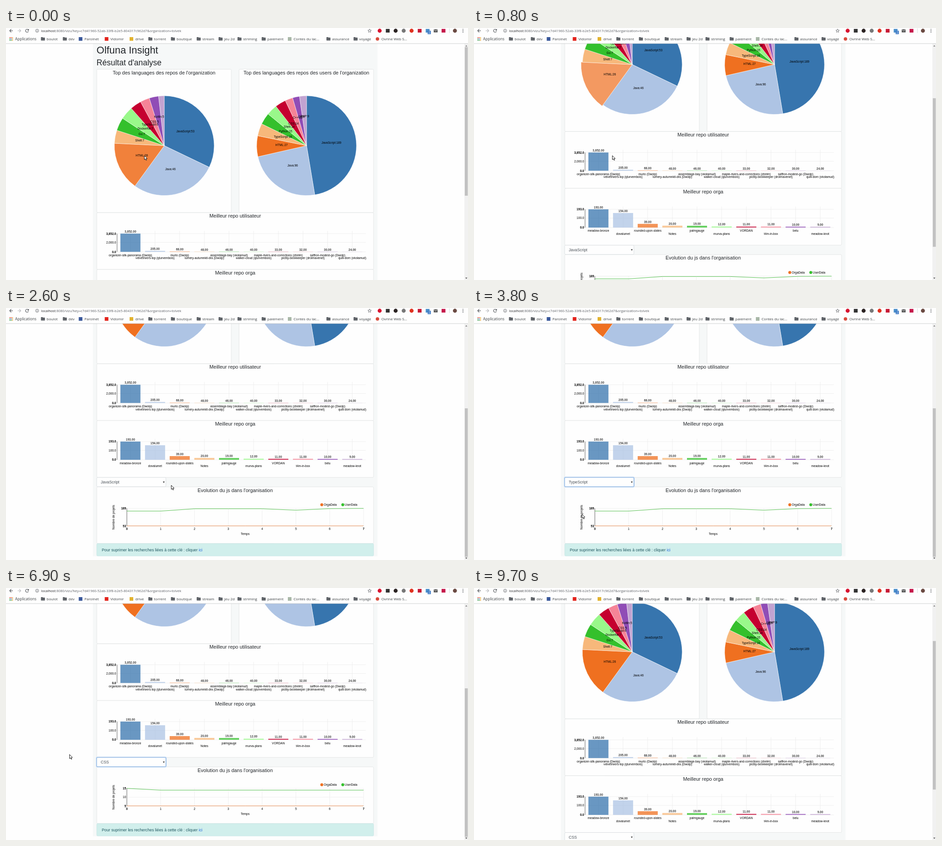
These frames come from a looping animation (1013 px wide and 553 px high, 9.9 s). An HTML page with a canvas:

```html
<!DOCTYPE html>
<html lang="fr">
<head>
<meta charset="utf-8">
<title>Tableau de bord</title>
<style>
  html, body { margin: 0; width: 100%; height: 100%; overflow: hidden; background: #fff; }
  canvas { display: block; }
</style>
</head>
<body>
<canvas id="stage" width="1013" height="553"></canvas>
<script>
const ctx = document.getElementById('stage').getContext('2d');
const LOOP = 9900, STEP = 100, TOP = 34;
const SANS = '"Liberation Sans", Arial, sans-serif';
const UI = '"Open Sans", "Noto Sans", sans-serif';
const SMALL = 6.56, TITLE = 10.94, BODY = 8.75;
const PALETTE = ['#3775ae', '#aec4e4', '#ef7020', '#f7b87b', '#34c02c',
                 '#99f88a', '#c5002f', '#f58497', '#904db6', '#c2a3d1'];

const orgLanguages = [['JavaScript', 53], ['Java', 46], ['HTML', 26], ['Shell', 7], ['Go', 7],
  ['Dockerfile', 7], ['TypeScript', 6], ['CSS', 5], ['Kotlin', 5], ['', 3]];
const userLanguages = [['JavaScript', 189], ['Java', 96], ['HTML', 27], ['TypeScript', 16], ['Python', 15],
  ['Shell', 14], ['CSS', 14], ['C++', 10], ['C#', 9], ['PHP', 9]];
const userRepos = [['organizer-silk-panorama (Dwolp)', 3852], ['velvetrivers-lop (qlurvembois)', 205],
  ['murlo (Dwolp)', 68], ['lumery-autumnkit-dra (Dwolp)', 48], ['assemblage-bay (vkolamud)', 46],
  ['walker-cloud (qlurvembois)', 40], ['maple-rivers-and-corrections (ztrelm)', 33],
  ['pictily-bookkeeper (drolmavenet)', 32], ['saffron-modest-go (Dwolp)', 30], ['quill-dorn (vkolamud)', 24]];
const orgRepos = [['meadow-bronze', 193], ['dovalumet', 154], ['rounded-upon-slates', 39], ['Notes', 20],
  ['palmgauge', 19], ['murva-plans', 12], ['VORDAN', 11], ['t4m-in-box', 11], ['belu', 10], ['meadow-knot', 9]];
const trends = {
  JavaScript: { min: 53, max: 189, ticks: [], user: [168, 168, 186, 186, 186, 175, 187, 189] },
  TypeScript: { min: 6, max: 16, ticks: [10], user: [14, 14, 16, 16, 16, 15, 16, 16] },
  CSS: { min: 5, max: 15, ticks: [10], user: [15, 14, 14, 14, 14, 14, 14, 14] }
};
const options = ['JavaScript', 'CSS', 'TypeScript', 'Python', 'HTML', 'Java', 'Shell'];

// Keyframes: time, then the values
const scrollKeys = [[500, 0], [600, 40], [700, 110], [800, 178], [900, 200], [1000, 213], [1100, 218.8],
  [1200, 218.8], [1300, 271.3], [1400, 282.8], [7300, 282.8], [7400, 220], [7500, 145], [7600, 118]];
const cursorKeys = [[2100, 303, 279.5], [2300, 378, 310], [2500, 372, 380], [2700, 352, 397], [2800, 352, 397],
  [2900, 344, 384], [3200, 344, 384], [3400, 243.5, 432], [3500, 243.5, 432], [3600, 236.5, 452],
  [4500, 236.5, 452], [4900, 300, 386], [5200, 300, 386], [5500, 262, 530], [5700, 242, 434],
  [6600, 242, 434], [6900, 139, 365], [7700, 139, 365], [8000, 21.5, 250], [8200, 4.5, 253],
  [8600, 4.5, 253], [9600, 9.5, 14]];

const clamp = x => Math.max(0, Math.min(1, x));
const mix = (a, b, k) => a + (b - a) * k;

function track(keys, t) {
  const next = keys.findIndex(key => key[0] > t);
  if (next === 0) return keys[0].slice(1);
  if (next < 0) return keys[keys.length - 1].slice(1);
  const a = keys[next - 1], b = keys[next];
  return a.slice(1).map((v, i) => mix(v, b[i + 1], (t - a[0]) / (b[0] - a[0])));
}

function text(s, x, y, { size = SMALL, align = 'left', color = '#000', weight = '', font = SANS } = {}) {
  ctx.font = `${weight} ${size}px ${font}`;
  ctx.textAlign = align;
  ctx.fillStyle = color;
  ctx.fillText(s, x, y);
}

function line(points, color, width = 0.6) {
  ctx.beginPath();
  points.forEach(([x, y]) => ctx.lineTo(x, y));
  ctx.strokeStyle = color;
  ctx.lineWidth = width;
  ctx.stroke();
}

function rect(x, y, w, h, color) {
  ctx.fillStyle = color;
  ctx.fillRect(x, y, w, h);
}

function dot(x, y, r, color) {
  ctx.beginPath();
  ctx.arc(x, y, r, 0, 7);
  ctx.fillStyle = color;
  ctx.fill();
}

function shape(points, color) {
  ctx.beginPath();
  points.forEach(([x, y]) => ctx.lineTo(x, y));
  ctx.closePath();
  ctx.fillStyle = color;
  ctx.fill();
}

function box(x, y, w, h, fill = '#fefefe', border = '#dcdedf', width = 0.7) {
  ctx.beginPath();
  ctx.roundRect(x, y, w, h, 2.2);
  ctx.fillStyle = fill;
  ctx.fill();
  ctx.strokeStyle = border;
  ctx.lineWidth = width;
  ctx.stroke();
}

function card(x, y, w, h, title) {
  box(x, y, w, h);
  text(title, x + w / 2, y + 11, { size: TITLE, align: 'center', color: '#212529' });
}

function pie(cx, data, raisedLabels, hover = 0) {
  const cy = 258.2, radius = 109.4, total = data.reduce((sum, d) => sum + d[1], 0);
  const labels = [];
  let start = -Math.PI / 2;
  data.forEach(([name, value], i) => {
    const end = start + value / total * Math.PI * 2, mid = (start + end) / 2;
    const lift = i === 2 ? hover : 0;
    ctx.beginPath();
    ctx.moveTo(cx, cy);
    ctx.arc(cx, cy, radius + 3 * clamp((lift - 0.4) / 0.6), start, end);
    ctx.closePath();
    ctx.globalAlpha = 1 - 0.3 * lift;
    ctx.fillStyle = PALETTE[i];
    ctx.fill();
    ctx.globalAlpha = 1;
    ctx.strokeStyle = '#fff';
    ctx.lineWidth = 0.6;
    ctx.stroke();
    const raise = raisedLabels.includes(i) ? 8.4 : 0;
    if (name) labels.push([`${name}:${value}`, cx + Math.cos(mid) * radius / 2, cy + Math.sin(mid) * radius / 2 - raise]);
    start = end;
  });
  labels.forEach(([s, x, y]) => text(s, x, y + 0.4, { align: 'center' }));
}

function barChart(base, data, tick) {
  const left = 243.5, height = 40, max = data[0][1];
  const center = i => 272.8 + 54.05 * i;
  const number = (v, digits) => v.toLocaleString('en-US', { minimumFractionDigits: digits });
  [0, tick, max].forEach(v => {
    const y = base - v / max * height;
    line([[left, y], [789, y]], '#e6e6e6');
    text(number(v, 1), 241.5, y + 2.3, { align: 'right', weight: v === tick ? '' : 'bold' });
  });
  data.forEach((d, i) => line([[center(i), base - 46], [center(i), base]], '#e6e6e6'));
  line([[left, base - height], [left, base]], '#444', 0.8);
  data.forEach(([name, value], i) => {
    const x = center(i), h = value / max * height;
    ctx.globalAlpha = 0.75;
    rect(x - 22, base - h, 44, h, PALETTE[i]);
    ctx.globalAlpha = 1;
    text(number(value, 2), x, base - h - 2.2, { align: 'center', weight: 'bold', color: '#444' });
    text(name, x, base + (i % 2 ? 16.2 : 9.4), { align: 'center' });
  });
}

function trendChart(from, to, progress) {
  const top = 722.5, bottom = 761.2, left = 265, right = 784;
  const x = i => mix(left, right, i / 7);
  const level = (d, i) => (d.user[i] - d.min) / (d.max - d.min);
  const axis = progress > 0 ? to : from;
  for (let i = 0; i < 8; i++) {
    line([[x(i), top], [x(i), bottom]], '#e6e6e6');
    text(i, x(i), 769.8, { align: 'center', weight: i % 7 ? '' : 'bold' });
  }
  [axis.min, ...axis.ticks, axis.max].forEach(v => {
    const y = mix(bottom, top, (v - axis.min) / (axis.max - axis.min));
    line([[left, y], [right, y]], '#e6e6e6');
    text(v, 263.3, y + 2.3, { align: 'right', weight: axis.ticks.includes(v) ? '' : 'bold' });
  });
  line([[left, top], [left, bottom]], '#444', 0.8);
  line([[left, bottom - 0.3], [right, bottom - 0.3]], '#e68a50', 1);
  line(from.user.map((_, i) => [x(i), mix(bottom, top, mix(level(from, i), level(to, i), progress))]), '#55c04f', 1);
  text('Temps', 524.3, 780.8, { align: 'center' });
  ctx.save();
  ctx.translate(237.8, 742);
  ctx.rotate(-Math.PI / 2);
  text('Nombre de projets', 0, 0, { align: 'center' });
  ctx.restore();
  dot(692.4, 714.5, 3.2, PALETTE[2]);
  text('OrgaData', 696.8, 716.8);
  dot(738.5, 714.5, 3.2, PALETTE[4]);
  text('UserData', 742.8, 716.8);
}

function selectBox(value, focused) {
  if (focused) box(197.4, 653.2, 154.6, 23, '#bfd8f5', '#d6e6f8');
  box(198.8, 654.6, 151.8, 20.3, '#fefefe', focused ? '#78a6da' : '#ced4da', focused ? 1 : 0.7);
  text(value, 207.7, 667.8, { size: BODY, color: '#495057' });
  shape([[344, 663.6], [348, 663.6], [346, 666.7]], '#333');
}

function optionMenu(current) {
  const rowHeight = 21.7;
  rect(198.5, 393, 152.5, 152, '#fff');
  rect(198.5, 393 + rowHeight * current, 152.5, rowHeight, '#cecece');
  options.forEach((name, i) => text(name, 207.7, 407 + rowHeight * i, { size: BODY, color: '#495057' }));
  ctx.strokeStyle = '#a9a9a9';
  ctx.lineWidth = 0.6;
  ctx.strokeRect(198.5, 393, 152.5, 152);
}

function page(t, scroll) {
  ctx.save();
  ctx.beginPath();
  ctx.rect(0, TOP, 1013, 519);
  ctx.clip();
  ctx.translate(0, -scroll);
  rect(190.5, TOP, 624, 793.5, '#f6f8f8');
  text('Olfuna Insight', 198.6, 55.6, { size: 21.9, color: '#212529' });
  text("Résultat d'analyse", 198.6, 82, { size: 17.5, color: '#212529' });

  card(199, 90.5, 295, 314.5, "Top des languages des repos de l'organization");
  card(511, 90.5, 295, 314.5, "Top des languages des repos des users de l'organization");
  pie(347, orgLanguages, [8], t < 2200 ? clamp(0.4 + t / 333) : 0);
  pie(659, userLanguages, [7, 8, 9]);

  card(199, 405.2, 607, 124.6, 'Meilleur repo utilisateur');
  barChart(491.2, userRepos, 2000);
  card(199, 529.9, 607, 124.6, 'Meilleur repo orga');
  barChart(615.9, orgRepos, 100);

  const [previous, current, changed] = t < 3800 ? ['JavaScript', 'JavaScript', 0]
    : t < 5900 ? ['JavaScript', 'TypeScript', 3800] : ['TypeScript', 'CSS', 5900];
  card(199, 675.3, 607, 124.3, "Evolution du js dans l'organisation");
  selectBox(current, t >= 2900 && t < 9500);
  trendChart(trends[previous], trends[current], clamp((t - changed) / 400));

  box(199, 799.7, 607, 27.2, '#d1efec', '#bfe3e2');
  const notice = 'Pour suprimer les recherches liées à cette clé : cliquer ';
  text(notice, 210, 816.5, { size: BODY, color: '#1f565f' });
  text('ici', 210 + ctx.measureText(notice).width, 816.5, { size: BODY, color: '#2467dc' });
  ctx.restore();
}

function scrollbar(scroll) {
  rect(1005, TOP, 8, 519, '#f1f1f1');
  rect(1006, 42 + scroll * 0.63, 6.4, 326, '#c1c1c1');
  shape([[1007, 40.5], [1011.6, 40.5], [1009.3, 37.8]], '#777');
  shape([[1007, 547.8], [1011.6, 547.8], [1009.3, 550.5]], '#505050');
}

function folder(x) {
  ctx.beginPath();
  ctx.roundRect(x - 4.4, 21, 8.8, 6.6, 0.8);
  ctx.roundRect(x - 4.4, 20, 4.2, 3, 0.8);
  ctx.fillStyle = '#5f6368';
  ctx.fill();
}

function arrow(x, direction, color) {
  line([[x - 3.5 * direction, 6], [x + 3.5 * direction, 6]], color, 1.1);
  line([[x, 2.5], [x + 3.5 * direction, 6], [x, 9.5]], color, 1.1);
}

function browserBar() {
  const ink = '#4d5156';
  rect(0, 0, 1013, TOP, '#fefefe');
  line([[0, 34.2], [1013, 34.2]], '#c4c6c8', 0.8);
  arrow(11.5, -1, ink);
  arrow(29, 1, '#b9bbbe');
  ctx.beginPath();
  ctx.arc(46.3, 6, 3.3, 0.4, 5.6);
  ctx.strokeStyle = ink;
  ctx.lineWidth = 1.1;
  ctx.stroke();
  shape([[50.2, 1.8], [50.2, 5.4], [46.6, 5.4]], ink);
  ctx.beginPath();
  ctx.arc(68.3, 6, 3.4, 0, 7);
  ctx.lineWidth = 0.8;
  ctx.stroke();
  line([[68.3, 5.4], [68.3, 8]], ink, 0.9);
  rect(67.9, 3.8, 0.9, 0.9, ink);

  const host = 'localhost', url = { size: 7.55, font: UI };
  text(host, 77, 8.7, { ...url, color: '#202124' });
  text(':8080/vizu?key=c7d41960-52ab-33f8-b2e5-804317c962d7&organization=tolvek',
    77 + ctx.measureText(host).width, 8.7, { ...url, color: '#5f6368' });

  const star = Array.from({ length: 11 }, (_, i) => {
    const r = i % 2 ? 1.8 : 4, a = i * Math.PI / 5 - Math.PI / 2;
    return [797.3 + r * Math.cos(a), 6.2 + r * Math.sin(a)];
  });
  line(star, ink, 0.8);

  [[819.3, '#d8132f'], [854.3, '#2b2322'], [872, '#777'], [889.3, '#e0311f'], [984.3, '#6b4a42']]
    .forEach(([x, color]) => dot(x, 6, 4.4, color));
  [[837, '#333'], [907, '#c81a35'], [924.5, '#4a8fcb'], [959.3, '#c5184a']]
    .forEach(([x, color]) => rect(x - 4.2, 2, 8.4, 8, color));
  rect(924.5, 6, 7, 7.5, '#3b78c4');
  text('2', 928, 12.2, { size: 6.5, align: 'center', color: '#fff', font: UI });
  rect(937.8, 2.8, 8.6, 6.8, '#555');
  line([[938, 3.5], [942.1, 6.6], [946.2, 3.5]], '#fff', 0.8);
  line([[972.3, 1], [972.3, 11]], '#c9cbce', 0.7);
  [2.8, 6, 9.2].forEach(y => dot(1002, y, 0.9, ink));

  const gridColors = ['#e04a3a', '#e04a3a', '#e8a52e', '#3a9c56', '#3f74d8', '#e8a52e', '#3a9c56', '#3a9c56', '#e8a52e'];
  gridColors.forEach((color, i) => rect(7.6 + i % 3 * 2.9, 20.2 + Math.floor(i / 3) * 2.9, 1.9, 1.9, color));
  const bookmark = { size: 8, font: UI, color: '#3c4043' };
  text('Applications', 20, 27, { ...bookmark, size: 8.2 });
  [['boulot', 89], ['dev', 137], ['torrent', 324.5], ['boutique', 374], ['stream', 430.5], ['jeu 2d', 478.5],
   ['striming', 520], ['paiement', 573], ['assurance', 715], ['voyage', 774.5]].forEach(([name, x]) => {
    folder(x - 8);
    text(name, x, 27, bookmark);
  });
  [['Parolnet', 172, '#39589b'], ['Vidomir', 229, '#e3241c'], ['drive', 283.5, '#e2b32e'],
   ['Contes du lac…', 630.5, '#a9b8a8']].forEach(([name, x, color]) => {
    rect(x - 12.5, 20, 8, 8, color);
    text(name, x, 27, bookmark);
  });
  dot(814.5, 24, 3.8, '#d94b3c');
  text('Ovrine Web S…', 823, 27, bookmark);
}

function cursor(x, y) {
  const outline = [[0, 0], [0, 9], [2.1, 7.1], [3.6, 10.4], [5, 9.8], [3.6, 6.6], [6.3, 6.4], [0, 0], [0, 1]]
    .map(([dx, dy]) => [x + 0.4 + dx, y + 0.5 + dy]);
  shape(outline, '#fff');
  line(outline, '#111', 0.95);
}

function draw(t) {
  const [scroll] = track(scrollKeys, t), [x, y] = track(cursorKeys, t);
  rect(0, 0, 1013, 553, '#fefefe');
  page(t, scroll);
  scrollbar(scroll);
  browserBar();
  if (t >= 3000 && t < 3800) optionMenu(t < 3400 ? 0 : 2);
  if (t >= 5000 && t < 5900) optionMenu(t < 5300 ? 2 : Math.floor((y - 393) / 21.7));
  if (t < 8400 || t >= 8700 && t < 9700) cursor(x, y);
}

const began = performance.now();
function tick() {
  const t = (performance.now() - began) % LOOP;
  draw(Math.floor(t / STEP) * STEP);
  requestAnimationFrame(tick);
}
tick();
</script>
</body>
</html>
```
